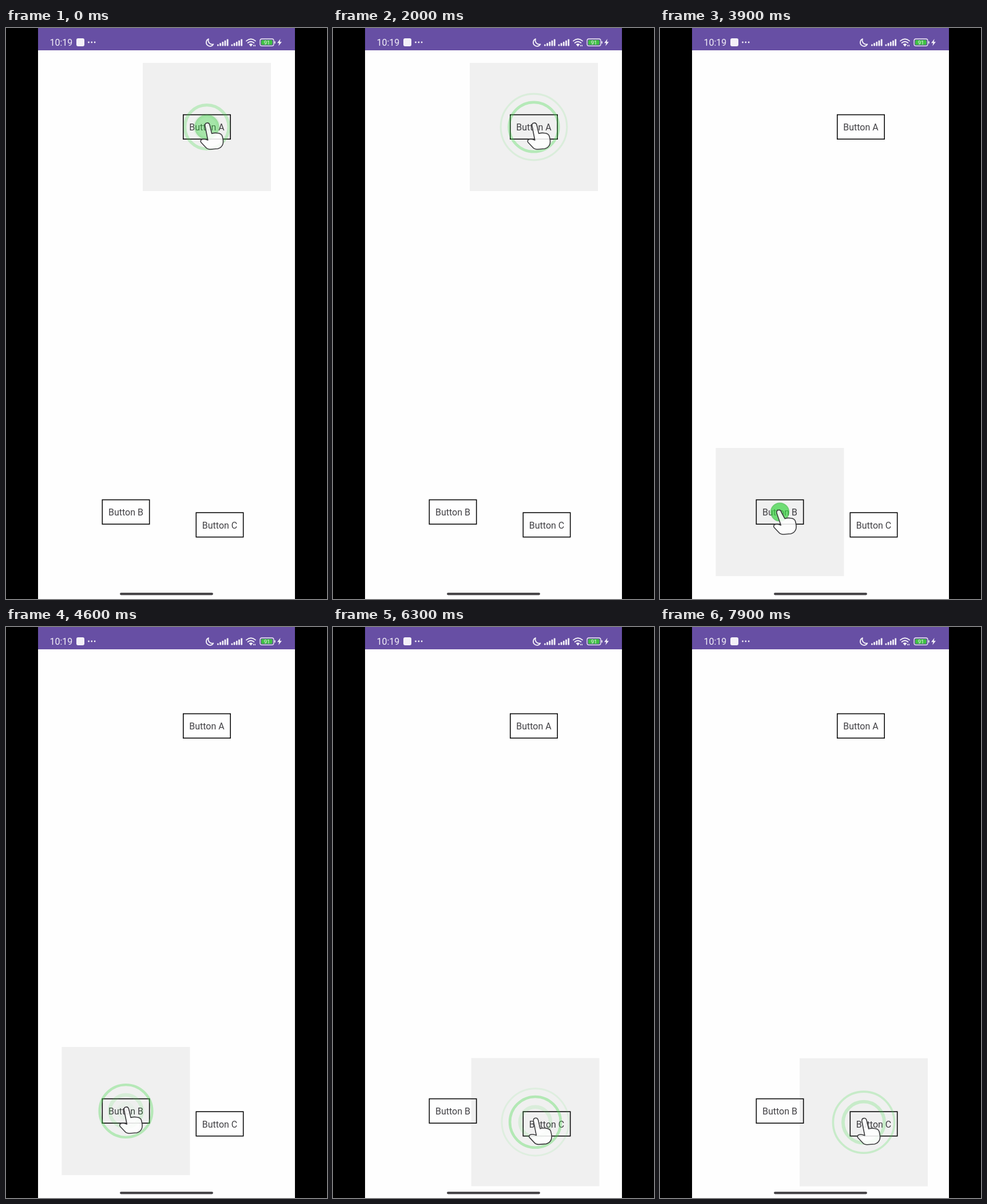
An HTML page that plays this animation: 561x998 px, repeating every 8 s.

```html
<!DOCTYPE html>
<html lang="en">
<head>
<meta charset="utf-8">
<title>Tap guide</title>
<style>
  html, body { margin: 0; width: 100%; height: 100%; overflow: hidden; background: #000; }
  svg { display: block; width: 100%; height: 100%; }
  text { font-family: Roboto, "Open Sans", sans-serif; font-size: 16px; }
  .button rect { fill: none; stroke: #0c0c0c; stroke-width: 1.6; }
  .button text { fill: #434246; text-anchor: middle; }
  .line { fill: none; stroke: #f3f0f8; stroke-width: 1.8; stroke-linecap: round; }
  .ring { fill: none; stroke: #43d94b; }
</style>
</head>
<body>
<svg viewBox="0 0 561 998">
  <rect width="561" height="998"/>
  <rect x="56" width="449" height="998" fill="#fefefe"/>
  <rect x="56" width="449" height="39" fill="#674fa4"/>

  <g id="status" fill="#f3f0f8">
    <text x="76.5" y="31">10:19</text>
    <rect x="123" y="18" width="14" height="14" rx="3"/>
    <circle cx="144.5" cy="25" r="1.4"/>
    <circle cx="149.8" cy="25" r="1.4"/>
    <circle cx="155.1" cy="25" r="1.4"/>
    <path class="line" d="M354 19.2A6.6 6.6 0 1 0 362.4 28.4A7 7 0 0 1 354 19.2Z" stroke-linejoin="round"/>
    <g id="bars"></g>
    <path class="line" d="M420 22.6Q428 15.8 436 22.6M422.6 26Q428 21.4 433.4 26"/>
    <path d="M424.6 28.6Q428 25.8 431.4 28.6L428 32.4Z"/>
    <path d="M432 29.5h1.4v2.6h-1.4zM434.6 29.5h1.4v2.6h-1.4z"/>
    <rect class="line" x="444" y="19" width="24" height="12.4" rx="3.4" style="stroke-width:1.3"/>
    <rect x="446" y="21" width="19.6" height="8.4" rx="1.6" fill="#3fc043"/>
    <rect x="469.2" y="23" width="1.6" height="4.4" rx=".8"/>
    <text x="456" y="28.7" text-anchor="middle" style="font-size:9.5px">91</text>
    <path d="M479.6 19L474 26.3H477.4L476.2 31.6L482 24.2H478.5Z"/>
  </g>

  <g id="buttons"></g>
  <rect x="199" y="987" width="163" height="4.2" rx="2.1" fill="#484649"/>

  <g id="guide">
    <rect x="-112" y="-112" width="224" height="224" fill-opacity=".055"/>
    <circle class="ring"/>
    <circle class="ring"/>
    <circle class="ring"/>
    <circle id="dot" fill="#37d640" stroke="#35c03c" stroke-width="2"/>
    <path id="hand" fill="#fff" fill-opacity=".86" stroke="#3c3c3e" stroke-width="1.6" stroke-linejoin="round"/>
  </g>
</svg>
<script>
const LOOP = 8000, TAP = 1500, TAP_OFFSET = 468, RING_GAP = 216;
const $ = id => document.getElementById(id);
const guide = $('guide'), dot = $('dot'), hand = $('hand');
const rings = [...document.querySelectorAll('.ring')];

const bar = (x, i) => {
  const h = 3 + i * 2.2;
  return `<rect x="${x + i * 4.2}" y="${31.4 - h}" width="2.8" height="${h}" rx="1"/>`;
};
$('bars').innerHTML = [369, 393.5].map(x => [0, 1, 2, 3, 4].map(i => bar(x, i)).join('')).join('');

$('buttons').innerHTML = [['A', 351, 173], ['B', 209.5, 846], ['C', 373.5, 868.5]].map(([name, x, y]) =>
  `<g class="button" transform="translate(${x} ${y})">
    <rect x="-41.2" y="-21.4" width="82.4" height="42.6"/><text y="6.2">Button ${name}</text></g>`).join('');

// Rows: [time, ...values], interpolated linearly.
function track(rows, t) {
  let i = 0;
  while (i < rows.length - 2 && t > rows[i + 1][0]) i++;
  const a = rows[i], b = rows[i + 1];
  const k = Math.min(1, Math.max(0, (t - a[0]) / (b[0] - a[0])));
  return a.slice(1).map((v, j) => v + (b[j + 1] - v) * k);
}

// radius, opacity, line width
const ringTrack = [
  [0, 4, 0, 8], [180, 15, .05, 7], [336, 26.5, .13, 6.5], [436, 36, .24, 5.8],
  [552, 44.3, .36, 4.6], [652, 53.5, .24, 3.6], [768, 58.5, .11, 3], [805, 59, 0, 2.8]
];
// radius, opacity
const dotTrack = [
  [0, 15, .64], [200, 14.5, .64], [368, 13.8, .52], [468, 20.5, .4], [570, 23, 0],
  [1180, 12, 0], [1300, 15.5, .7], [1368, 15.6, .7], [1500, 15, .64]
];
const pressTrack = [[0, 1], [200, 1], [400, 0], [1170, 0], [1320, 1], [1500, 1]];

// Critically damped spring, 0 to 1
function spring(ms) {
  const s = Math.max(0, ms) * .0387;
  return 1 - (1 + s) * Math.exp(-s);
}

function handPath(k) {
  const p = (x, y) => `${x - 2.5 * k} ${y + 3.5 * k}`;
  return `M${p(-3.2, -2)}C${p(-3.8, -8)} ${p(3.8, -9.2)} ${p(5.2, -3)}L8.6 11.4
    Q14 9.8 19 10.8Q25.5 11.4 27 16Q29.6 25 28 30Q25.5 36.5 19 38L6 39
    Q1 39 -2 35.5L-10 27Q-12.2 23.6 -8.6 21.8Q-4 20.4 1.8 23Z`;
}

function draw(t) {
  const toB = spring(t - 2600), toC = spring(t - 6145);
  const x = 351 - 141.5 * toB + 146.5 * toC;
  const y = 173 + 673 * toB + 19.7 * toC;
  guide.setAttribute('transform', `translate(${x} ${y})`);

  const phase = (t + TAP_OFFSET) % TAP;
  rings.forEach((ring, i) => {
    const [r, alpha, width] = track(ringTrack, phase - i * RING_GAP);
    ring.setAttribute('r', r);
    ring.setAttribute('stroke-width', width);
    ring.setAttribute('opacity', alpha);
  });
  const [r, alpha] = track(dotTrack, phase);
  dot.setAttribute('r', r);
  dot.setAttribute('opacity', alpha);
  hand.setAttribute('d', handPath(track(pressTrack, phase)[0]));
}

const start = performance.now();
function tick() {
  draw((performance.now() - start) % LOOP);
  requestAnimationFrame(tick);
}
tick();
</script>
</body>
</html>
```
